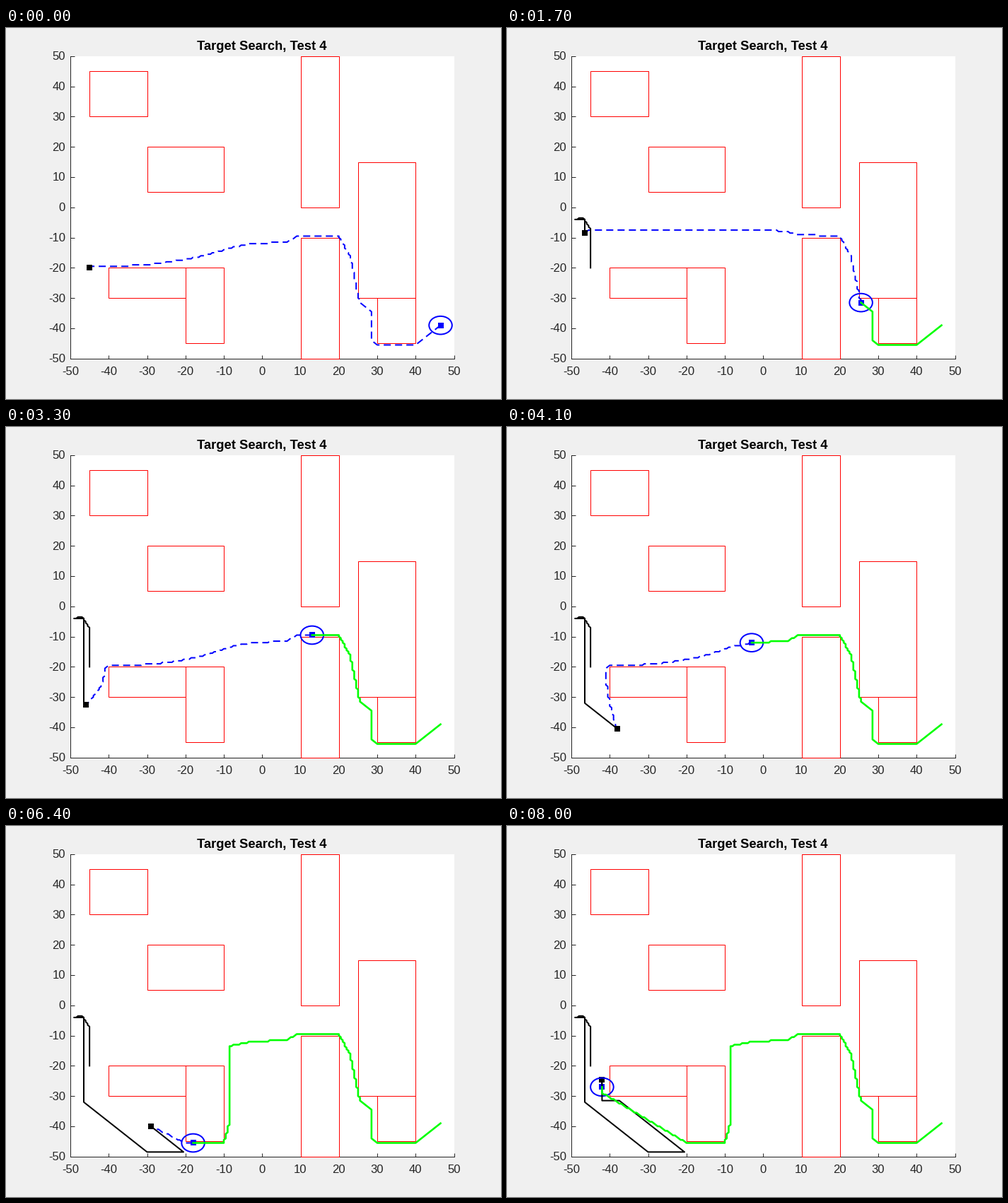
Write a matplotlib script that moves like this. It is 700x525 px and loops after 9 s.

```python
import numpy as np
import matplotlib.pyplot as plt
from matplotlib.animation import FuncAnimation
from matplotlib.patches import Ellipse, Rectangle

W, H, DPI = 700, 525, 100
PT = 72 / DPI  # points per pixel
INK = (0.15, 0.15, 0.15)
BLUE, GREEN = (0, 0, 1), (0, 1, 0)
LEFT, RIGHT, TOP, BOTTOM = 91, 633.5, 39.9, 467.75
LAST_STEP = 80

plt.rcParams["font.family"] = "Liberation Sans"

OBSTACLES = [(-45, 30, 15, 15), (-30, 5, 20, 15), (10, 0, 10, 50),
             (25, -30, 15, 45), (30, -45, 10, 15), (10, -50, 10, 40),
             (-40, -30, 20, 10), (-20, -45, 10, 25)]


def linear(u):
    return u


def early(p):
    return lambda u: 1 - (1 - u) ** p


def late(p):
    return lambda u: u ** p


def stairs(a, b, ease=linear):
    """Half-unit steps along the longer axis; the other one is eased."""
    a, b = np.array(a, float), np.array(b, float)
    d = b - a
    major = int(abs(d[1]) > abs(d[0]))
    u = np.linspace(0, 1, int(round(2 * abs(d[major]))) + 1)
    points = a + d * np.where(np.arange(2) == major, u[:, None],
                              ease(u)[:, None])
    return np.floor(points * 2 + 0.5) / 2


class Walk:
    """Stepped walk through (time, x, y) key points."""

    def __init__(self, *keys):
        legs = [stairs(a[1:], b[1:]) for a, b in zip(keys, keys[1:])]
        self.points = np.vstack(legs)
        self.times = np.concatenate(
            [np.linspace(a[0], b[0], len(leg))
             for a, b, leg in zip(keys, keys[1:], legs)])

    def index(self, t):
        return int(np.argmin(np.abs(self.times - t)))

    def at(self, t):
        return self.points[self.index(t)]

    def trail(self, t):
        return self.points[:self.index(t) + 1]

    def ahead(self, t, end):
        return self.points[self.index(t):self.index(max(t, end)) + 1]


target = Walk((0, -45, -20), (8.5, -45, -7), (11.2, -47, -3.5),
              (12.6, -49, -4), (14, -46.5, -4), (32.7, -46.5, -32),
              (49, -30, -48.5), (55.3, -20.5, -48.5), (72.3, -37.5, -31.5),
              (75.3, -42, -31.5), (80, -42, -24.5))

searcher = Walk((0, 46.5, -39), (4.3, 40, -45.5), (9.3, 30, -45.5),
                (10.3, 28.5, -44), (15, 28.5, -34.5), (17, 25.5, -31.5),
                (20, 24.5, -26), (25, 23, -16.5), (29.5, 20, -9.5),
                (35, 9, -9.5), (36.6, 6.5, -11.5), (41, -3, -12),
                (44, -8.5, -13.5), (56.5, -8.5, -38.5), (60, -10, -45.5),
                (65, -20, -45.5), (78.7, -42, -29), (80, -42, -27))


def plan(t):
    """Searcher's intended route: its coming walk, then steps to the target."""
    x, y = goal = target.at(t)
    if t >= 44:  # below the blocks
        rising = t >= 56 and y >= -45.5
        head = searcher.ahead(t, 65 if rising else 60)
        tail = stairs(head[-1], goal, linear if rising else late(2.5))
    elif y > -13.5:  # high above the blocks
        head = searcher.ahead(t, 29.5)
        gap, turn = (8.5, -9), (x + 1, y + 1)
        steep = early(30 / max(abs(turn[1] - gap[1]), 1.5))
        tail = np.vstack([stairs(head[-1], gap), stairs(gap, turn, steep),
                          [goal]])
    else:  # along the top of the blocks
        head = searcher.ahead(t, 44)
        if y > -23:
            drop, ease = (0.5, early(2.5)) if t < 13 else (2.5, linear)
            tail = np.vstack([stairs(head[-1], goal + drop, ease), [goal]])
        else:
            tail = np.vstack([stairs(head[-1], (-40, -19.5), early(2.5)),
                              stairs((-41, -20.5), goal, late(2))])
    return np.vstack([head, tail])


fig = plt.figure(figsize=(W / DPI, H / DPI), dpi=DPI, facecolor="#f0f0f0")
ax = fig.add_axes([LEFT / W, 1 - BOTTOM / H,
                   (RIGHT - LEFT) / W, (BOTTOM - TOP) / H])
ax.set(xlim=(-50, 50), ylim=(-50, 50), facecolor="white")
ax.spines[["top", "right"]].set_visible(False)
ax.spines[["left", "bottom"]].set(color=INK, linewidth=PT)
ticks = range(-50, 51, 10)
ax.set_xticks(ticks)
ax.set_yticks(ticks)
ax.tick_params(direction="in", length=5.5 * PT, width=PT, color=INK,
               labelbottom=False, labelleft=False)


def label(x, y, text, size=16.67, color=INK, **style):
    fig.text(x / W, 1 - y / H, text, va="baseline", size=size * PT,
             color=color, **style)


for k in ticks:
    share = (k + 50) / 100
    label(LEFT + share * (RIGHT - LEFT), 491, str(k), ha="center")
    label(84, BOTTOM - share * (BOTTOM - TOP) + 5.4, str(k), ha="right")
label(362.2, 31, "Target Search, Test 4", 18.33, "black", ha="center",
      weight="bold")

for x, y, w, h in OBSTACLES:
    ax.add_patch(Rectangle((x, y), w, h, fill=False, ec="red", lw=PT,
                           clip_on=False, zorder=3))


def line(color, width, zorder, **style):
    return ax.plot([], [], color=color, lw=width * PT, zorder=zorder,
                   clip_on=False, **style)[0]


def square(color):
    return line(color, 0, 5, marker="s", ms=8 * PT, mew=0)


plan_line = line(BLUE, 2, 4, dashes=(5, 3), dash_capstyle="butt")
sensor = ax.add_patch(Ellipse((0, 0), 6, 6, fill=False, ec=BLUE,
                              lw=2 * PT, zorder=6))
actors = [(target, square("black"), line("black", 2, 6)),
          (searcher, square(BLUE), line(GREEN, 2.6, 7))]


def update(i):
    t = min(i, LAST_STEP)
    for walk, mark, trail in actors:
        mark.set_data(*walk.at(t)[:, None])
        trail.set_data(*walk.trail(t).T)
    sensor.center = tuple(searcher.at(t))
    plan_line.set_data(*plan(t).T)


anim = FuncAnimation(fig, update, frames=90, interval=100, repeat=True)
plt.show()
```
